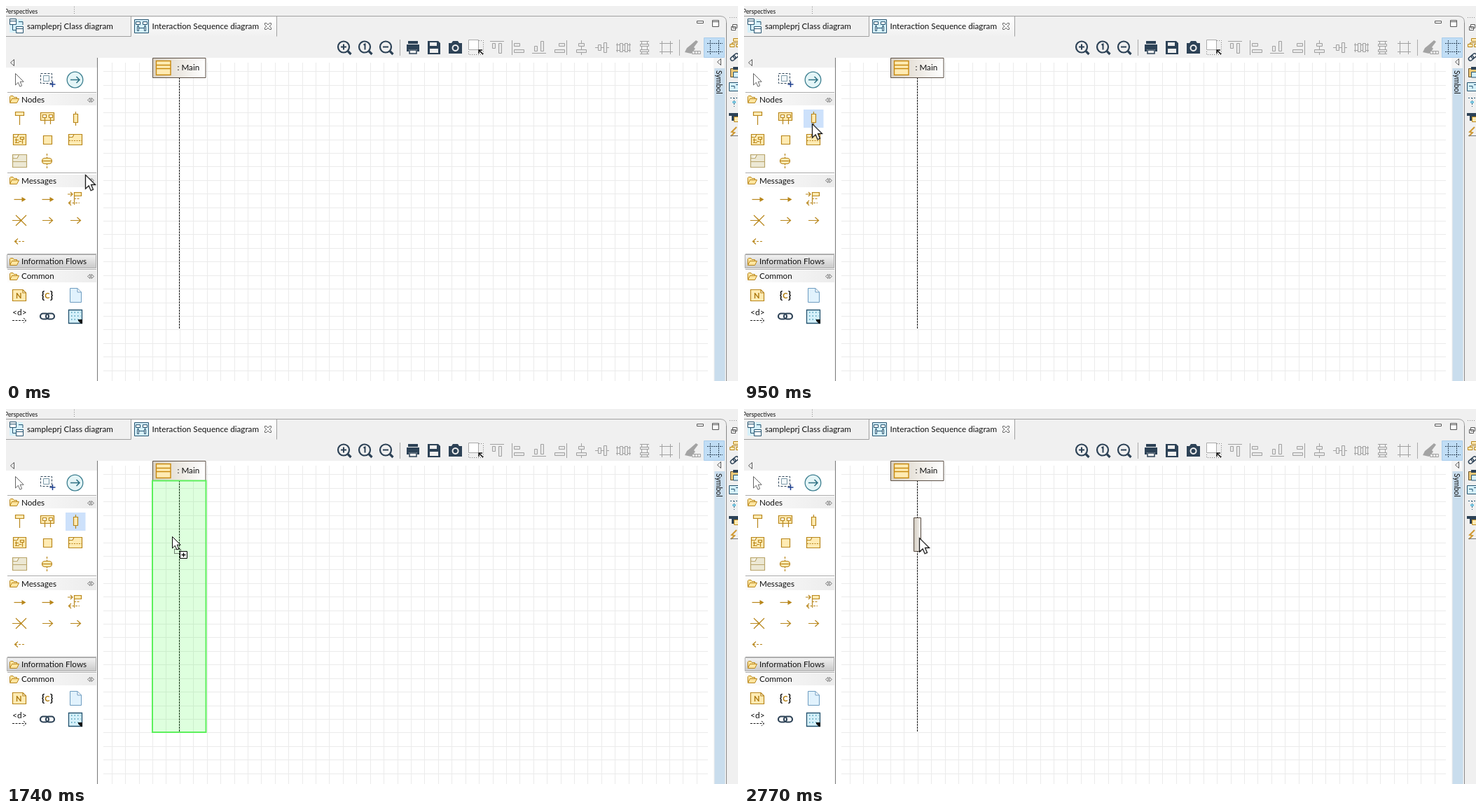
An HTML page that plays this animation: 1045x536 px, repeating every 3.33 s.

```html
<!DOCTYPE html>
<html lang="en">
<head>
<meta charset="utf-8">
<title>Sequence diagram editor</title>
<style>
html, body { margin: 0; width: 100%; height: 100%; overflow: hidden; background: #f0f0f0; }
svg { display: block; }
text { font: 11.7px Lato, "Open Sans", sans-serif; fill: #111; }
.gold { stroke: #b8861b; fill: #ffebb3; }
.open { fill: none; }
.head { fill: #b8861b; }
.navy { stroke: #2d4256; fill: none; }
.ink { fill: #2d4256; stroke: none; }
.gray { stroke: #a0a0a0; fill: none; }
.soft { fill: #e9e9e9; }
.blue { stroke: #24536f; fill: #d5f0fa; }
.edge { stroke: #a0a0a0; fill: none; }
.crisp { shape-rendering: crispEdges; }

/* Every state holds until the next one. */
.anim { animation: 3330ms step-end infinite; }
#cursor { animation-name: travel; }
#arrow { animation-name: arrow; }
#noDrop { animation-name: no-drop; }
#copy { animation-name: copy; }
#hoverFragment { animation-name: hover-fragment; }
#hoverBar { animation-name: hover-bar; }
#click { animation-name: click; }
#dropZone { animation-name: drop-zone; }
#execution { animation-name: execution; }

@keyframes travel {
  0% { transform: translate(113px, 241px); }
  2.7% { transform: translate(113px, 238px); }
  4.95% { transform: translate(111px, 228px); }
  7.2% { transform: translate(108px, 212px); }
  9.45% { transform: translate(103px, 192px); }
  11.71% { transform: translate(99px, 176px); }
  13.96% { transform: translate(97px, 170px); }
  16.21% { transform: translate(97px, 168px); }
  38.13% { transform: translate(104px, 168px); }
  40.54% { transform: translate(122px, 170px); }
  42.94% { transform: translate(152px, 173px); }
  45.34% { transform: translate(188px, 177px); }
  47.44% { transform: translate(217px, 180px); }
  49.84% { transform: translate(236px, 182px); }
  52.25% { transform: translate(237px, 182px); }
  55.25% { transform: translate(241px, 183px); }
  57.35% { transform: translate(247px, 184px); }
  59.45%, 100% { transform: translate(250px, 184px); }
}
@keyframes arrow {
  0% { visibility: visible; }
  42.94% { visibility: hidden; }
  83.18%, 100% { visibility: visible; }
}
@keyframes no-drop {
  0% { visibility: hidden; }
  42.94% { visibility: visible; }
  52.25%, 100% { visibility: hidden; }
}
@keyframes copy {
  0% { visibility: hidden; }
  52.25% { visibility: visible; }
  83.18%, 100% { visibility: hidden; }
}
@keyframes hover-fragment {
  0% { visibility: hidden; }
  9.45% { visibility: visible; }
  11.71%, 100% { visibility: hidden; }
}
@keyframes hover-bar {
  0% { fill: transparent; }
  11.71% { fill: #fde2b3; }
  28.52% { fill: #cde1fb; }
  83.18%, 100% { fill: transparent; }
}
@keyframes click {
  0% { visibility: hidden; }
  24.02% { visibility: visible; }
  28.52% { visibility: hidden; }
  73.57% { visibility: visible; }
  80.48%, 100% { visibility: hidden; }
}
@keyframes drop-zone {
  0% { visibility: hidden; }
  52.25% { visibility: visible; }
  83.18%, 100% { visibility: hidden; }
}
@keyframes execution {
  0% { visibility: hidden; }
  83.18%, 100% { visibility: visible; }
}
</style>
</head>
<body>
<svg width="1045" height="536" viewBox="0 0 1045 536">
<defs>
  <linearGradient id="node"><stop stop-color="#d9d1c4"/><stop offset="1" stop-color="#fff"/></linearGradient>
  <linearGradient id="bar"><stop stop-color="#cfc8bd"/><stop offset="1" stop-color="#faf8f4"/></linearGradient>
  <linearGradient id="drawer"><stop stop-color="#fcfcfc"/><stop offset="1" stop-color="#ececec"/></linearGradient>
  <linearGradient id="closed" x2="0" y2="1"><stop stop-color="#f2f2f2"/><stop offset="1" stop-color="#c9c9c9"/></linearGradient>
  <linearGradient id="tab" x2="0" y2="1"><stop stop-color="#fff"/><stop offset="1" stop-color="#f0f0f0"/></linearGradient>
  <g id="folder" fill="#ffe5a0" stroke="#b8861b">
    <path d="M.5 9.5V1.5L1.5 .5H5L6.5 2.5H10.5V4.5"/><path d="M.5 10.5L3.5 4.5H13.5L10.5 10.5Z"/>
  </g>
  <path id="pin" d="M4 .5L.5 3.5L4 6.5V.5M6 .5L9.5 3.5L6 6.5V.5" fill="#fff" stroke="#666" stroke-width=".9"/>
  <g id="lens"><circle r="8" stroke-width="2.2"/><path d="M6 6L10.5 10.5" stroke-width="3.2"/></g>
  <g id="message"><path d="M-8 0H5" stroke-width="1.2"/><path class="head" stroke="none" d="M3 -3.500L9 0L3 3.500Z"/></g>
  <path id="signal" class="open" d="M-7 0H7M2.5 -4.5L7.5 0L2.5 4.5"/>
  <g id="chain" class="navy" stroke-width="2.2">
    <rect x="-10" y="-4" width="12" height="8" rx="4"/><rect x="-2" y="-4" width="12" height="8" rx="4"/>
  </g>
  <path id="pointer" d="M0 0V16.5L3.9 12.8L6.4 18.6L9.2 17.4L6.7 11.7H11.7Z" fill="#fff" stroke="#000" stroke-linejoin="miter"/>
</defs>

<!-- window frame and tabs -->
<path fill="#f0f0f0" d="M0 0H1045V536H0Z"/>
<text x="-2" y="10.5" style="font-size:8.5px">Perspectives</text>
<path d="M97.500 1V13" stroke="#888" stroke-dasharray="1 2"/>
<path d="M178 44V20Q178 15.500 182 15.500H386.500V44Z" fill="url(#tab)"/>
<path class="edge" d="M0 14.500H1020Q1028.500 15 1028.500 23V536M0 43.500H178.500V15M386.500 15V43.500"/>
<text x="30" y="33">sampleprj Class diagram</text>
<text x="208.500" y="33">Interaction Sequence diagram</text>
<g class="blue">
  <path d="M5 19H24V38H5Z" stroke="none"/>
  <path fill="#fff" d="M5.500 18.500H14.500V26.500H5.500ZM14.500 29.500H24.500V38.500H14.500ZM5.500 21.500H14.500M14.500 32.500H24.500"/>
  <path class="open" d="M9.500 27V34.500H14M18 22.500H24V27"/>
  <path d="M183.500 19.500H203.500V38.500H183.500Z"/>
  <path fill="#fff" d="M185.500 22.500H191.500V26.500H185.500ZM195.500 22.500H201.500V26.500H195.500ZM187.500 29.500H189.500V35.500H187.500ZM197.500 29.500H199.500V35.500H197.500Z"/>
  <path class="open" d="M188.500 27V29M198.500 27V29M190 31.500H197"/>
</g>
<path d="M369.500 24.500H372L374 27L376 24.500H378.500V27L376 29L378.500 31V33.500H376L374 31L372 33.500H369.500V31L372 29L369.500 27Z" fill="#fff" stroke="#666"/>
<path d="M986.500 21.500H995.500V24.500H986.500ZM1008.500 20.500H1017.500V29.500H1008.500ZM1008.500 22.500H1017.500" fill="#fff" stroke="#555"/>

<!-- toolbar -->
<g class="navy">
  <use href="#lens" x="482" y="58.500"/><use href="#lens" x="512" y="58.500"/><use href="#lens" x="542" y="58.500"/>
  <path stroke-width="2" d="M478 58.500H486M482 54.500V62.500M510.500 55.500L512.500 54.500V62.500M538 58.500H546"/>
</g>
<path stroke="#aaa" d="M562.500 48V71M961.500 48V71"/>
<g class="ink">
  <path d="M574 50H588V54H574ZM572 55H590V65H587V62H575V65H572Z"/>
  <path d="M576 63H586V68H576Z" fill="#f0f0f0" stroke="#2d4256" stroke-width="1.500"/>
  <path fill-rule="evenodd" d="M602 50H617L620 53V69H602ZM605 52V57H615V52ZM605 61V67H617V61Z"/>
  <path fill-rule="evenodd" d="M632 53H636L638 50H645L647 53H651V68H632ZM641.500 55A5 5 0 1 0 641.600 55Z"/>
  <circle cx="641.500" cy="60" r="3"/>
</g>
<path d="M660.500 48.500H674.500V62.500H660.500Z" fill="#fff" stroke="#aaa"/>
<path d="M675 49.500H681.500V69.500H660.500V63" fill="none" stroke="#777" stroke-dasharray="1 2"/>
<path d="M681 69L675 63M675 68V63H680" fill="none" stroke="#111" stroke-width="1.500"/>
<g class="gray">
  <path d="M691 50.500H711"/><path class="soft" d="M694.500 53.500H698.500V60.500H694.500ZM703.500 53.500H707.500V67.500H703.500Z"/>
  <path d="M722.500 49V70"/><path class="soft" d="M725.500 53.500H733.500V57.500H725.500ZM725.500 62.500H739.500V66.500H725.500Z"/>
  <path d="M751 67.500H771"/><path class="soft" d="M754.500 57.500H758.500V64.500H754.500ZM763.500 50.500H767.500V64.500H763.500Z"/>
  <path d="M800.500 49V70"/><path class="soft" d="M789.500 53.500H797.500V57.500H789.500ZM783.500 62.500H797.500V66.500H783.500Z"/>
  <path d="M821.500 49V70"/><path class="soft" d="M817.500 53.500H825.500V57.500H817.500ZM814.500 62.500H828.500V66.500H814.500Z"/>
  <path d="M841 59.500H861"/><path class="soft" d="M845.500 55.500H849.500V63.500H845.500ZM853.500 52.500H857.500V66.500H853.500Z"/>
  <path d="M872.500 53V66M890.500 53V66M871 55.500H892M871 63.500H892"/><path class="soft" d="M876.500 53.500H880.500V65.500H876.500ZM883.500 53.500H887.500V65.500H883.500Z"/>
  <path d="M905 50.500H918M905 68.500H918M907.500 50V69M915.500 50V69"/><path class="soft" d="M905.500 54.500H917.500V57.500H905.500ZM905.500 62.500H917.500V65.500H905.500Z"/>
  <path d="M936.500 50V69M948.500 50V69M933 53.500H952M933 65.500H952"/>
</g>
<path d="M985 49L988 51L982 59L984 61L978 68L969 66L972 60L977 56Z" fill="#a3a3a3"/>
<path d="M979.500 64.500H991.500V68.500H979.500ZM983.500 64V69M987.500 64V69" fill="#e8e8e8" stroke="#a3a3a3"/>
<path d="M996.500 45.500H1025.500V73.500H996.500Z" fill="#c0ddf5" stroke="#a9cdec"/>
<path d="M1005.500 49V70M1017.500 49V70M1001 53.500H1023M1001 65.500H1023" stroke="#2d4256" stroke-dasharray="2 1"/>

<!-- canvas: each set of grid lines is one wide dashed stroke -->
<path fill="#fff" d="M131 74H1010V536H131Z"/>
<g class="crisp" stroke="#ebebeb" stroke-dasharray="1 18.420">
  <path d="M150.740 308.500H1002" stroke-width="455"/>
  <path d="M570.500 93.420V536" stroke-width="863"/>
</g>
<path class="crisp" d="M247.500 102V462" stroke="#222" stroke-dasharray="3 1"/>
<path d="M209.500 74.500H285V102.500H209.500Z" fill="url(#node)" stroke="#5d5147"/>
<path class="gold" stroke-width="1.400" d="M214.500 78.500H235V98.500H214.500ZM214.500 84.500H235M214.500 89.500H235" style="stroke:#c88a10"/>
<text x="244.500" y="92">: Main</text>
<path id="execution" class="anim" d="M242.500 155.500H252.500V203.500H242.500Z" fill="url(#bar)" stroke="#54483f"/>
<path id="dropZone" class="anim" d="M209 102.500H285.500V462H209Z" fill="#0f0" fill-opacity=".13" stroke="#5cf05c" stroke-width="2"/>

<!-- palette -->
<path fill="#fff" d="M0 74H130V536H0Z"/>
<path fill="#f0f0f0" d="M0 74H130V88H0Z"/>
<path d="M130.500 74V536" stroke="#777"/>
<path d="M11.500 76.500V85.500L6.500 81Z" fill="#fff" stroke="#555"/>
<path d="M2 125H129V142H2ZM2 241H129V259H2ZM2 378H129V395H2Z" fill="url(#drawer)"/>
<path d="M1.500 355.500H128.500V374.500H1.500Z" fill="url(#closed)" stroke="#b0b0b0"/>
<path d="M2 123.500H129M2 238.500H129M2 354.500H129M2 376.500H129" stroke="#aaa"/>
<use href="#folder" x="5" y="128"/><use href="#folder" x="5" y="244"/><use href="#folder" x="5" y="360"/><use href="#folder" x="5" y="381"/>
<use href="#pin" x="116" y="131"/><use href="#pin" x="116" y="246"/><use href="#pin" x="116" y="383"/>
<text x="22" y="138">Nodes</text><text x="22" y="254">Messages</text>
<text x="22" y="369">Information Flows</text><text x="22" y="390">Common</text>

<use href="#pointer" x="13.500" y="96.500" opacity=".6"/>
<path d="M49.500 96.500H65.500V110.500H49.500Z" class="navy" stroke-dasharray="3 2"/>
<path d="M53.500 99.500H61.500V107.500H53.500Z" fill="#f3f8fa" stroke="#7b98a6"/>
<path d="M66.500 108V116M62.500 112H70.500" stroke="#1d3f8f" stroke-width="1.500"/>
<circle cx="98.500" cy="105.500" r="11.300" fill="#e4f5f7" stroke="#3d7f90" stroke-width="1.300"/>
<path d="M92 105.500H105M100.500 101L105 105.500L100.500 110" fill="none" stroke="#2d7183" stroke-width="1.500"/>

<path id="hoverFragment" class="anim" fill="#fde2b3" d="M85 178H113V204H85Z"/>
<path id="hoverBar" class="anim" fill="transparent" d="M85 148H113.500V174H85Z"/>
<g class="gold" stroke-width="1.200">
  <path d="M13.500 151.500H25.500V156.500H13.500ZM19.500 156.500V170"/>
  <path d="M49.500 152.500H68.500V163.500H49.500Z"/><path fill="#fff" d="M52.500 155.500H57.500V159.500H52.500ZM61.500 155.500H66.500V159.500H61.500Z"/>
  <path d="M55.500 160V169M63.500 160V169"/>
  <path d="M99.500 151V171"/><path d="M96.500 154.500H102.500V166.500H96.500Z"/>
  <path d="M10.500 183.500H28.500V198.500H10.500ZM10.500 187.500H16L18 183.500"/>
  <path class="open" d="M14.500 189V196M13 191.500H18M13 195.500H19M20.500 187.500H25.500V190.500H20.500ZM23.500 191V197M18 193.500H22"/>
  <path d="M53.500 185.500H65.500V197.500H53.500Z"/>
  <path d="M89.500 183.500H108.500V198.500H89.500ZM89.500 187.500H95L97 183.500"/><path stroke-dasharray="2 1.500" d="M90 192.500H108"/>
  <path d="M9.500 212.500H29.500V230.500H9.500ZM9.500 217.500H16L18.500 212.500M10 222.500H29" style="fill:#ece8d4;stroke:#b9a56b"/>
  <path stroke-dasharray="3 1.500" d="M58.500 211V232"/><rect x="51.500" y="217.500" width="14" height="8" rx="4"/><path d="M51 221.500H66"/>
  <use href="#message" x="19.500" y="276.500"/><use href="#message" x="59.500" y="276.500"/>
  <path d="M97.500 266.500H107.500V271.500H97.500Z"/><path class="open" d="M88 269H95M92 266L95 269L92 272M97.500 272V284"/>
  <path class="open" stroke-dasharray="3 1.500" d="M90 281.500H105M97 275.500H105"/><path class="open" d="M93 278L89.500 281.500L93 285"/>
  <path class="open" d="M9 306.500H22M17 302L22 306.500L17 311M14 299L29 314M29 299L14 314"/>
  <use href="#signal" x="59" y="306.500"/><use href="#signal" x="99" y="306.500"/>
  <path class="open" stroke-dasharray="3 2" d="M13 336.500H28"/><path class="open" d="M17 332.500L12.500 336.500L17 340.500"/>
  <path d="M9.500 405.500H24L28.500 410V421.500H9.500ZM24 405.500V410H28.500"/>
</g>
<text x="14" y="418" style="font-size:11px;font-weight:700;fill:#a87408">N</text>
<text x="59" y="418" text-anchor="middle" style="font-size:15px;font-weight:700">{<tspan style="font-size:11px;fill:#b07a08">C</tspan>}</text>
<path d="M91.500 403.500H102L107.500 409V423.500H91.500ZM102 403.500V409H107.500" fill="#e1f2fd" stroke="#6e9cc0"/>
<text x="9" y="442" style="font-size:12px">&lt;d&gt;</text>
<path d="M9 449.500H28M25 446L29 449.500L25 453" fill="none" stroke="#222" stroke-dasharray="3 1.500"/>
<use href="#chain" x="59" y="443.500"/>
<path class="blue" d="M89.500 434.500H108.500V453.500H89.500Z" stroke-width="1.300"/>
<path d="M93 438H107M93 443H107M93 448H107" stroke="#4b9bb5" stroke-dasharray="1.500 3" stroke-width="1.500"/>
<path d="M103 448H109V454H107L103 450Z" fill="#111"/>

<!-- collapsed view and trim -->
<path d="M1010 74H1028V536H1010Z" fill="#f5f5f5"/>
<path d="M1012 89H1026V536H1012Z" fill="#c9dded"/>
<path d="M1011.500 89V536M1026.500 74V536" stroke="#dbe5ec"/>
<path d="M1020.500 75.500V84.500L1015.500 80Z" fill="#fff" stroke="#555"/>
<text transform="translate(1013.500 92) rotate(90)" style="font-size:10.500px">Symbol</text>
<path d="M1028.500 24V536" stroke="#888"/>
<path d="M1033 16.500H1044" stroke="#888" stroke-dasharray="1 2"/>
<path d="M1037.500 26.500H1043.500V31.500H1037.500ZM1035.500 29.500H1041.500V34.500H1035.500Z" fill="#fff" stroke="#555"/>
<path class="gold" d="M1038.500 46.500H1047V50.500H1038.500ZM1033.500 54.500H1040V58.500H1033.500ZM1042.500 54.500H1049V58.500H1042.500ZM1036.500 54V52.500H1046"/>
<use href="#chain" transform="translate(1040 73) rotate(-40) scale(.65)"/>
<path d="M1034.500 89.500H1048V101.500H1034.500Z" fill="#edc878" stroke="#66522b"/><path d="M1038 87H1046V91H1038Z" class="ink"/><path d="M1038.500 94.500H1048V102H1038.500Z" class="blue"/>
<path class="blue" d="M1032.500 109.500H1048V121.500H1032.500ZM1035 114.500H1040V118M1042 112.500H1047"/>
<path class="blue open" d="M1034 131.500H1048M1039.500 131V144" stroke-dasharray="2 2"/><path d="M1037 136H1042V139H1037Z" fill="#75c4df"/>
<path class="ink" d="M1032 153H1046V157H1032ZM1036 157H1045V164H1036Z"/><path class="gold" d="M1039.500 158.500H1048V165.500H1039.500Z"/>
<path d="M1043 173L1036 180L1040 181L1035 186" fill="none" stroke="#d09a35" stroke-width="2"/><path d="M1034 185.500H1045" stroke="#777"/>

<!-- pointer -->
<g id="cursor" class="anim">
  <circle id="click" class="anim" cx="-.5" cy=".5" r="11.500" fill="#ff0" fill-opacity=".68"/>
  <g id="arrow" class="anim"><use href="#pointer" transform="translate(.5 .5) scale(1.200)"/></g>
  <g id="noDrop" class="anim" fill="none">
    <circle r="9.500" stroke="#fff" stroke-width="4.500"/>
    <g stroke="#000" stroke-width="2.800"><circle r="9.300" fill="#fff"/><path d="M-6.500 -6.500L6.500 6.500"/></g>
  </g>
  <g id="copy" class="anim">
    <path d="M3.500 18.500H12.500V24.500H3.500Z" fill="none" stroke="#000" stroke-dasharray="1 1"/>
    <use href="#pointer" x=".5" y=".5"/>
    <path d="M11.500 21.500H21.500V31.500H11.500Z" fill="#fff" stroke="#000"/>
    <path d="M13.500 26.500H19.500M16.500 23.500V29.500" stroke="#000" stroke-width="1.300"/>
  </g>
</g>
</svg>
</body>
</html>
```
